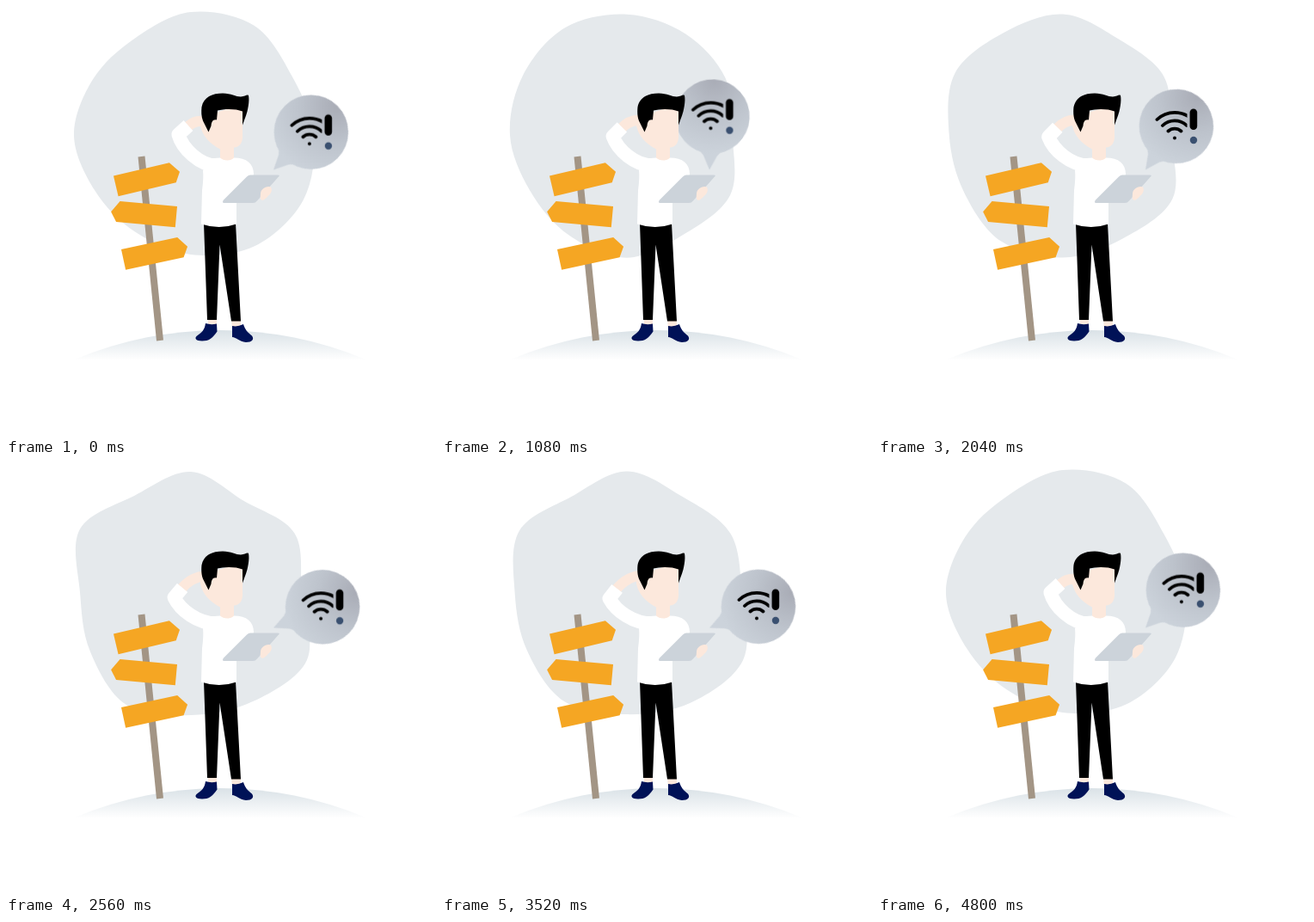
Animation, 500 px wide and 500 px high, one loop 4840 ms. Source, as an HTML page:

```html
<!DOCTYPE html>
<html lang="en">
<head>
<meta charset="utf-8">
<title>Lost connection</title>
<style>
  html, body { margin: 0; width: 100%; height: 100%; overflow: hidden; background: #fff; }
  svg { display: block; width: 100%; height: 100%; }

  .blob, .bubble, .glyph, .sleeve, .hand { animation: 4840ms ease infinite; }
  .blob { fill: #e5e9ec; animation-name: morph; }
  .bubble { --lean: 45deg; --far: 75.5deg; transform-origin: 311px 190.5px; animation-name: swing; }
  .glyph { animation-name: level; }
  .sleeve { fill: none; stroke: #fff; stroke-width: 16; stroke-linejoin: round; animation-name: sleeve; }
  .hand { fill: none; stroke: #fce8dc; stroke-width: 12; animation-name: hand; }

  .skin { fill: #fce8dc; }
  .shoe { fill: #001257; }
  .wave { fill: none; stroke: #000; stroke-width: 3.8; stroke-linecap: round; }

  @keyframes morph {
    0%, 100% { d: var(--round); }
    33% { d: var(--drop); }
    66% { d: var(--wavy); }
  }
  @keyframes swing {
    0%, 100% { transform: rotate(var(--lean)); }
    33% { transform: rotate(0deg); }
    66% { transform: rotate(var(--far)); }
  }
  /* Turns back against the swing, so the sign inside stays upright. */
  @keyframes level {
    0%, 100% { transform: rotate(calc(-1 * var(--lean))); }
    33% { transform: rotate(0deg); }
    66% { transform: rotate(calc(-1 * var(--far))); }
  }
  @keyframes sleeve {
    0%, 33%, 100% { d: path("M245 186C225 186 205 166 200.500 150L212 139.500"); }
    15%, 72% { d: path("M245 186C222 186 202 171 194.500 157L203.500 145.500"); }
  }
  @keyframes hand {
    0%, 33%, 100% { d: path("M211 141Q222 131 234 136"); }
    15%, 72% { d: path("M202 147Q216 130 234 130"); }
  }
</style>
</head>
<body>
<svg viewBox="0 0 500 500">
  <defs>
    <linearGradient id="soil" gradientUnits="userSpaceOnUse" x1="0" y1="377" x2="0" y2="412">
      <stop stop-color="#dae2e7"/>
      <stop offset="1" stop-color="#fff"/>
    </linearGradient>
    <radialGradient id="glass" gradientUnits="userSpaceOnUse" cx="311" cy="86" r="86">
      <stop stop-color="#a9acb6"/>
      <stop offset=".5" stop-color="#bdc3cc"/>
      <stop offset="1" stop-color="#ccd3db"/>
    </radialGradient>
    <clipPath id="cut"><path d="M-40 -40H14.500V10H-40Z"/></clipPath>
    <path id="sign" fill="#f5a623" d="M0 0H66.700L76 13.200L69 24.300H0Z"/>
  </defs>

  <path class="blob"/>
  <path d="M80 411A437 437 0 0 1 418 411Z" fill="url(#soil)"/>

  <g class="bubble" fill="url(#glass)">
    <path d="M288 165Q299 168 303 174L311 190.5L319 174Q323 168 334 165Z"/>
    <circle cx="311" cy="128.5" r="43.3"/>
    <g transform="translate(311 128.5)">
      <g class="glyph" fill="#000">
        <g transform="translate(-2 13.500)">
          <path class="wave" clip-path="url(#cut)"
            d="M-20.500 -21.500A29.700 29.700 0 0 1 20.500 -21.500M-14 -14.500A20.200 20.200 0 0 1 14 -14.500M-7.500 -8A11 11 0 0 1 7.500 -8"/>
          <circle r="2"/>
        </g>
        <rect x="15.600" y="-20.500" width="8.600" height="24.600" rx="4.300"/>
        <circle cx="20" cy="16" r="4.200" fill="#3a5070"/>
      </g>
    </g>
  </g>

  <path d="M157.500 175L179 389" stroke="#a39585" stroke-width="8"/>
  <use href="#sign" transform="translate(125 197.500) rotate(-13.300)"/>
  <use href="#sign" transform="translate(199 233) rotate(5.200) scale(-1 1)"/>
  <use href="#sign" transform="translate(134 283) rotate(-12.200)"/>

  <g transform="translate(0 -.5)">
    <path class="skin" d="M235 362H245V374H235ZM262 364H273V376H263Z"/>
    <path d="M230 253Q248 258 267 253L273 367H262L248.5 278L245 365.5H234Z"/>
    <path class="shoe" d="M232 369.5Q238 371.5 245 370L245.5 379C240 387 236 390 228 390C221 390 219 387 221.5 384.5C228 380 231 377 232 369.5Z"/>
    <path class="shoe" d="M263 372.5Q269 374 276 370.5C278 377 281 380 286 384C289 388 286 391.5 279 391.5C271 390.5 268 386 263 385.5Z"/>

    <path class="hand"/>
    <path class="sleeve"/>
    <path fill="#fff" d="M249 177H265C280 177 288 184 288 196L284 212L268 225V254Q248 261 227 254L228 215Q230 200 229 192L236 178Z"/>
    <path class="skin" d="M226 130L262 119L275 122V149C276 160 271 165 265 165V177C262 181 253 181 249 177V167Q230 157 226 140Z"/>
    <path d="M235.500 147L229 134C227 129 227 123 227.500 118C230 106 240 102 252 102C262 102 267 106 273 106C278 106 280 103 282 104.500C283.500 111 281 123 279 128L275 139V123C267 119.500 253 120 246 122L245 133C240 132 239 136 238.500 140Z"/>

    <path fill="#ccd3da" d="M284 197H316Q319 197 317 199L292 227Q290 229.500 287 229.500H253Q251 229 253 226L280 199Q282 197 284 197Z"/>
    <path class="skin" d="M296 219C296 213 303 209 308 211C310 215 308 219 305 221C302 225 299 227 297 226C295 224 296 221 296 219Z"/>
  </g>
</svg>
<script>
  // Radii around the centre, clockwise from the top in equal steps.
  const center = [215, 150];
  const shapes = {
    round: [143, 147, 136, 143, 151, 149, 139, 130, 129, 136, 131, 130],
    drop: [140, 135, 132, 121, 138, 132, 143, 135, 130, 136, 140, 145],
    wavy: [141, 122, 140, 130, 158, 147, 142, 152, 136, 128, 150, 129]
  };

  // Closed Catmull-Rom curve written as cubic segments.
  function smooth(radii) {
    const n = radii.length;
    const at = i => {
      const turn = 2 * Math.PI * i / n, r = radii[(i + n) % n];
      return [center[0] + r * Math.sin(turn), center[1] - r * Math.cos(turn)];
    };
    const ctrl = (p, from, to) => p.map((v, k) => v + (to[k] - from[k]) / 6).join(' ');
    let d = 'M' + at(0).join(' ');
    for (let i = 0; i < n; i++) {
      const [a, b, c, e] = [at(i - 1), at(i), at(i + 1), at(i + 2)];
      d += `C${ctrl(b, a, c)} ${ctrl(c, e, b)} ${c.join(' ')}`;
    }
    return `path("${d}Z")`;
  }

  const blob = document.querySelector('.blob');
  for (const name in shapes) blob.style.setProperty('--' + name, smooth(shapes[name]));
</script>
</body>
</html>
```
